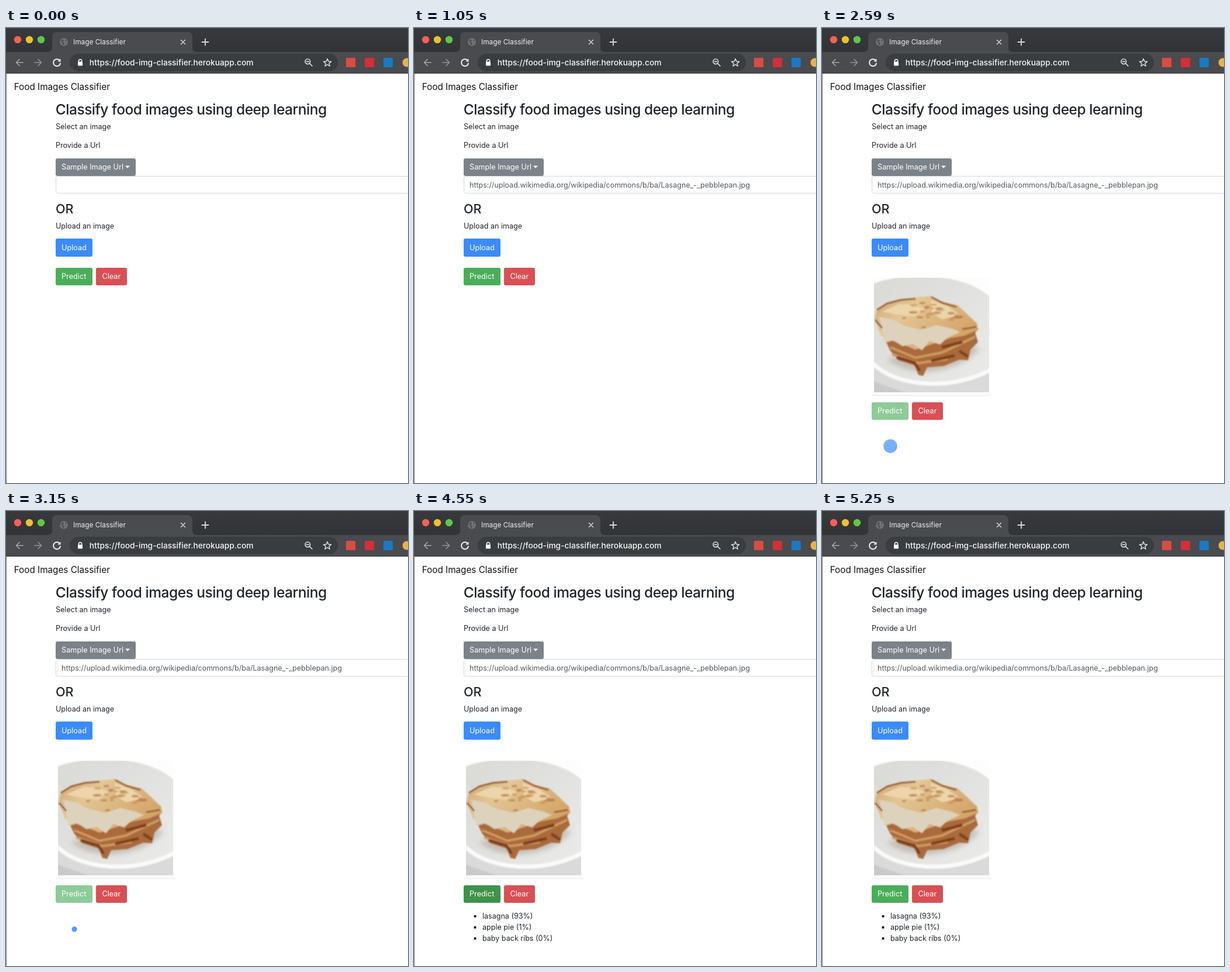
Animation, 688 px wide and 778 px high, one loop 5320 ms. Source, as an HTML page:

```html
<!DOCTYPE html>
<html lang="en">
<head>
<meta charset="utf-8">
<title>Image Classifier</title>
<style>
  html, body { margin: 0; width: 100%; height: 100%; overflow: hidden; background: #fff; }
  svg { display: block; width: 688px; height: 778px; }
  text {
    font-family: Inter, Roboto, "Liberation Sans", sans-serif;
    font-size: 12.55px; fill: #212529; font-optical-sizing: none; white-space: pre;
  }
  .btn text { font-size: 12.7px; fill: #fff; }
  .line { fill: none; stroke-linecap: round; stroke-linejoin: round; }
</style>
</head>
<body>
<svg viewBox="0 0 688 778" xmlns="http://www.w3.org/2000/svg">
  <defs>
    <clipPath id="photoClip"><rect x="89" y="427" width="197" height="196"/></clipPath>
    <linearGradient id="plate" x1="0" y1="0" x2="1" y2="1">
      <stop offset="0" stop-color="#d9d9d5"/>
      <stop offset=".5" stop-color="#e2e3e1"/>
      <stop offset="1" stop-color="#ececeb"/>
    </linearGradient>
    <linearGradient id="crust" x1="0" y1="0" x2="1" y2=".6">
      <stop offset="0" stop-color="#d0a573"/>
      <stop offset=".35" stop-color="#e3c595"/>
      <stop offset="1" stop-color="#d3a264"/>
    </linearGradient>
    <linearGradient id="strip" x1="0" y1="0" x2="0" y2="1">
      <stop offset="0" stop-color="#38393c"/>
      <stop offset="1" stop-color="#323336"/>
    </linearGradient>
    <filter id="soft" x="-10%" y="-10%" width="120%" height="120%"><feGaussianBlur stdDeviation="1.2"/></filter>
    <filter id="haze" x="-30%" y="-30%" width="160%" height="160%"><feGaussianBlur stdDeviation="5"/></filter>
  </defs>

  <rect width="688" height="778" fill="#fff"/>

  <g id="page">
    <text x="13.700" y="106" style="font-size:15.27px;fill:#111">Food Images Classifier</text>
    <text x="84.800" y="148" style="font-size:24.5px;font-weight:500;letter-spacing:-.48px">Classify food images using deep learning</text>
    <text x="85" y="173">Select an image</text>
    <text x="85" y="205">Provide a Url</text>

    <rect x="85.5" y="253.5" width="640" height="29" rx="3" fill="#fff" stroke="#d3d7db"/>
    <text id="address" x="95" y="273" style="font-size:12.5px;fill:#54595e">https://upload.wikimedia.org/wikipedia/commons/b/ba/Lasagne_-_pebblepan.jpg</text>

    <text x="85" y="317" style="font-size:21.6px;font-weight:500">OR</text>
    <text x="85" y="343">Upload an image</text>
    <g class="btn">
      <rect x="85" y="360" width="63" height="31" rx="3" fill="#3b8bfd"/>
      <text x="95" y="380">Upload</text>
    </g>

    <g class="btn">
      <rect id="ring" x="83.5" y="221.500" width="140" height="33" rx="4.500" fill="#c5c8cc"/>
      <rect id="picker" x="85" y="223" width="137" height="30" rx="3"/>
      <text x="95" y="242">Sample Image Url</text>
      <path d="M204 235.500h8l-4 4.200z" fill="#fff"/>
    </g>

    <g id="photo">
      <path d="M85 628H289" stroke="#dfe2e5"/>
      <g clip-path="url(#photoClip)">
        <rect x="89" y="427" width="197" height="196" fill="#fdfdfd"/>
        <g filter="url(#soft)">
          <path d="M80 441C110 424 185 418 236 433C265 441 280 453 296 467V640H80Z" fill="url(#plate)"/>
          <path d="M80 566C110 602 165 612 215 607C250 603 275 592 296 581V640H80Z" fill="#d9dad9"/>
          <path d="M80 566C110 602 165 612 215 607C250 603 275 592 296 581" fill="none" stroke="#fafafa" stroke-width="7"/>
          <path d="M80 600C105 612 130 619 150 626H80Z" fill="#c9cac9"/>
        </g>
        <path d="M110 566C160 605 240 585 270 548L240 540Z" fill="#a3988c" opacity=".5" filter="url(#haze)"/>
        <g filter="url(#soft)">
          <path d="M104 525L117 552L131 568L159 577L165 593L173 595L180 580L208 578L235 567L250 568L254 550L267 537L262 521L268 514L230 500Z" fill="#ab6a3a"/>
          <path d="M117 546L160 564L205 555L262 528M120 558L165 573L215 566" fill="none" stroke="#cf9a60" stroke-width="4"/>
          <path d="M128 563L158 572L167 586M187 569L227 560M235 552L250 562M205 546L240 537" fill="none" stroke="#80411f" stroke-width="5"/>
          <path d="M90 498L93 484L110 471L132 464L160 461L187 458L206 468L232 474L247 488L265 505L267 516L244 526L220 530L190 540L160 550L139 541L119 534L101 526Z" fill="url(#crust)"/>
          <path d="M98 494L122 499L140 509L170 516L196 508L222 514L236 520L214 530L202 541L184 535L171 551L155 540L138 544L122 534L107 538L103 515Z" fill="#ddd3bd"/>
          <path d="M103 485L132 472L160 473L176 481L158 493L128 490ZM186 465L216 476L236 491L205 498L188 487Z" fill="#ecd5aa"/>
          <g id="browning"></g>
          <path d="M94 482L112 471L135 465L160 463M187 460L206 470L230 477M91 499L103 513M240 515L264 511" fill="none" stroke="#9a6338" stroke-width="3"/>
        </g>
      </g>
    </g>

    <g id="actions" class="btn">
      <rect id="predict" x="85" y="410" width="63" height="30" rx="3"/>
      <text x="95" y="429">Predict</text>
      <rect x="154" y="410" width="53" height="30" rx="3" fill="#d94f54"/>
      <text x="164.500" y="429">Clear</text>
    </g>

    <circle id="pulse" cx="117" cy="715" fill="#3a8dfb"/>
    <g id="results"></g>

    <g id="menu">
      <rect x="86" y="254" width="240.500" height="141" rx="3.500" fill="#fff" stroke="#d2d3d5"/>
    </g>
  </g>

  <path d="M.5 78V778" stroke="#77787a"/>

  <g id="browser">
    <rect width="688" height="42" fill="url(#strip)"/>
    <rect y="41" width="688" height="37" fill="#494b4f"/>
    <path d="M0 77.500H688" stroke="#3d3f42"/>
    <path d="M71 41Q79 41 79 33V15Q79 7 87 7H311Q319 7 319 15V33Q319 41 327 41Z" fill="#494b4f"/>
    <circle cx="20" cy="20" r="6.200" fill="#f95f58"/>
    <circle cx="40" cy="20" r="6.200" fill="#edc02f"/>
    <circle cx="60" cy="20" r="6.200" fill="#5fc845"/>
    <circle cx="99" cy="24" r="6.800" fill="#737578"/>
    <path d="M94 21l4-2 1 3-2 2 3 2-1 4-3-3zM101 19l3 3-2 2zM102 26l2-1-2 3z" fill="#4f5155"/>
    <text x="115" y="28" style="font-size:11.85px;fill:#eceded">Image Classifier</text>
    <path class="line" d="M299.500 20.500l7 7m0-7l-7 7" stroke="#d3d4d5" stroke-width="1.500"/>
    <path class="line" d="M335.500 24h11m-5.500-5.500v11" stroke="#d8d9da" stroke-width="1.800"/>

    <rect x="109" y="44" width="459" height="30" rx="15" fill="#3a3d40"/>
    <g class="line" stroke-width="1.700">
      <path d="M29 59H17.500m5.500-5.500L17.500 59l5.500 5.500" stroke="#a3a5a7"/>
      <path d="M49 59H60.500m-5.500-5.500L60.500 59l-5.500 5.500" stroke="#909295"/>
      <path d="M91.600 55.200A6 6 0 1 0 93 60.500" stroke="#f1f1f1" stroke-width="1.900"/>
      <path d="M124.300 58v-1.600a2.700 2.700 0 0 1 5.400 0V58" stroke="#fff" stroke-width="1.400"/>
      <circle cx="516.300" cy="57.300" r="4.300" stroke="#d9dadb"/>
      <path d="M519.700 60.700l4.300 4.300M514.400 57.300h3.800" stroke="#d9dadb"/>
      <path id="star" stroke="#e1e2e3" stroke-width="1.400"/>
    </g>
    <path d="M93.500 52.500v5h-5z" fill="#f1f1f1"/>
    <rect x="123" y="57.500" width="8" height="7" rx="1" fill="#fff"/>
    <text x="142.800" y="64" style="font-size:13.75px;font-weight:500;fill:#f5f5f5">https://food-img-classifier.herokuapp.com</text>

    <rect x="582" y="51" width="16" height="16" rx="1.500" fill="#db4c40"/>
    <rect x="614" y="51" width="16" height="16" rx="1.500" fill="#d32f36"/>
    <rect x="646" y="51" width="16" height="16" rx="1.500" fill="#1979c4"/>
    <circle cx="686" cy="59" r="7.500" fill="#e8b34b"/>
  </g>
</svg>

<script>
  const LOOP = 5320, STEP = 70;
  const at = {
    hover: 210, open: 350, choose: 980, loaded: 1120,
    scroll: 1610, scrollEnd: 1890,
    press: 2170, pulse: 2325, done: 4200, leave: 4900
  };
  const PULSE = { period: 730, radius: 28 };

  const el = id => document.getElementById(id);
  const svgNode = (parent, tag, attrs, label = '') => {
    const node = document.createElementNS('http://www.w3.org/2000/svg', tag);
    for (const key in attrs) node.setAttribute(key, attrs[key]);
    node.textContent = label;
    parent.append(node);
  };
  const set = (id, key, value) => el(id).setAttribute(key, value);
  const show = (id, on) => set(id, 'visibility', on ? 'visible' : 'hidden');

  ['lasagne', 'sushi', 'waffles', 'eggplant (not in training data)', 'table (not in training & not a food)']
    .forEach((label, i) => svgNode(el('menu'), 'text', { x: 105, y: 278.5 + i * 25.3 }, label));

  ['lasagna (93%)', 'apple pie (1%)', 'baby back ribs (0%)'].forEach((label, i) => {
    const y = 697 + i * 19;
    svgNode(el('results'), 'circle', { cx: 104.5, cy: y - 4, r: 2.2, fill: '#212529' });
    svgNode(el('results'), 'text', { x: 117, y }, label);
  });

  // Toasted patches scattered over the tilted top of the dish.
  let seed = 7;
  const random = () => (seed = seed * 16807 % 2147483647) / 2147483647;
  for (let i = 0; i < 26; i++) {
    const u = random(), v = random();
    svgNode(el('browning'), 'ellipse', {
      cx: 104 + 70 * u + 76 * v, cy: 486 - 19 * u + 28 * v,
      rx: 3 + 5 * random(), ry: 1.5 + 1.5 * random(),
      fill: i % 3 ? '#c99153' : '#b0743f', opacity: 0.65
    });
  }

  const starPoints = Array.from({ length: 10 }, (_, i) => {
    const angle = i * Math.PI / 5 - Math.PI / 2, r = i % 2 ? 3 : 7;
    return `${550 + r * Math.cos(angle)} ${59.5 + r * Math.sin(angle)}`;
  });
  set('star', 'd', `M${starPoints.join('L')}Z`);

  function predictColor(t) {
    if (t >= at.pulse && t < at.done) return '#8dcb99';
    const hovered = (t >= at.press && t < at.pulse) || (t >= at.done && t < at.leave);
    return hovered ? '#3f914b' : '#4aad5a';
  }

  function render(time) {
    const t = Math.floor((time % LOOP) / STEP) * STEP;
    const open = t >= at.open && t < at.choose;
    const loaded = t >= at.loaded;
    const waiting = t >= at.pulse && t < at.done;

    show('menu', open);
    show('ring', open);
    set('picker', 'fill', t >= at.hover && t < at.choose ? '#62686e' : '#7b8289');
    show('address', t >= at.choose);
    show('photo', loaded);
    set('actions', 'transform', `translate(0 ${loaded ? 230 : 0})`);
    set('predict', 'fill', predictColor(t));
    show('results', t >= at.done);

    const glide = (t - at.scroll) / (at.scrollEnd - at.scroll);
    const lift = glide > 0 && glide < 1 ? 4 * Math.sin(Math.PI * glide) : 0;
    set('page', 'transform', `translate(0 ${-lift})`);

    show('pulse', waiting);
    if (waiting) {
      const u = ((t - at.pulse) % PULSE.period) / PULSE.period;
      const grow = u * (1.25 - 0.25 * u);
      set('pulse', 'r', PULSE.radius * grow);
      set('pulse', 'opacity', 1 - 0.73 * grow);
    }
  }

  const start = performance.now();
  function tick() {
    render(performance.now() - start);
    requestAnimationFrame(tick);
  }
  tick();
</script>
</body>
</html>
```
